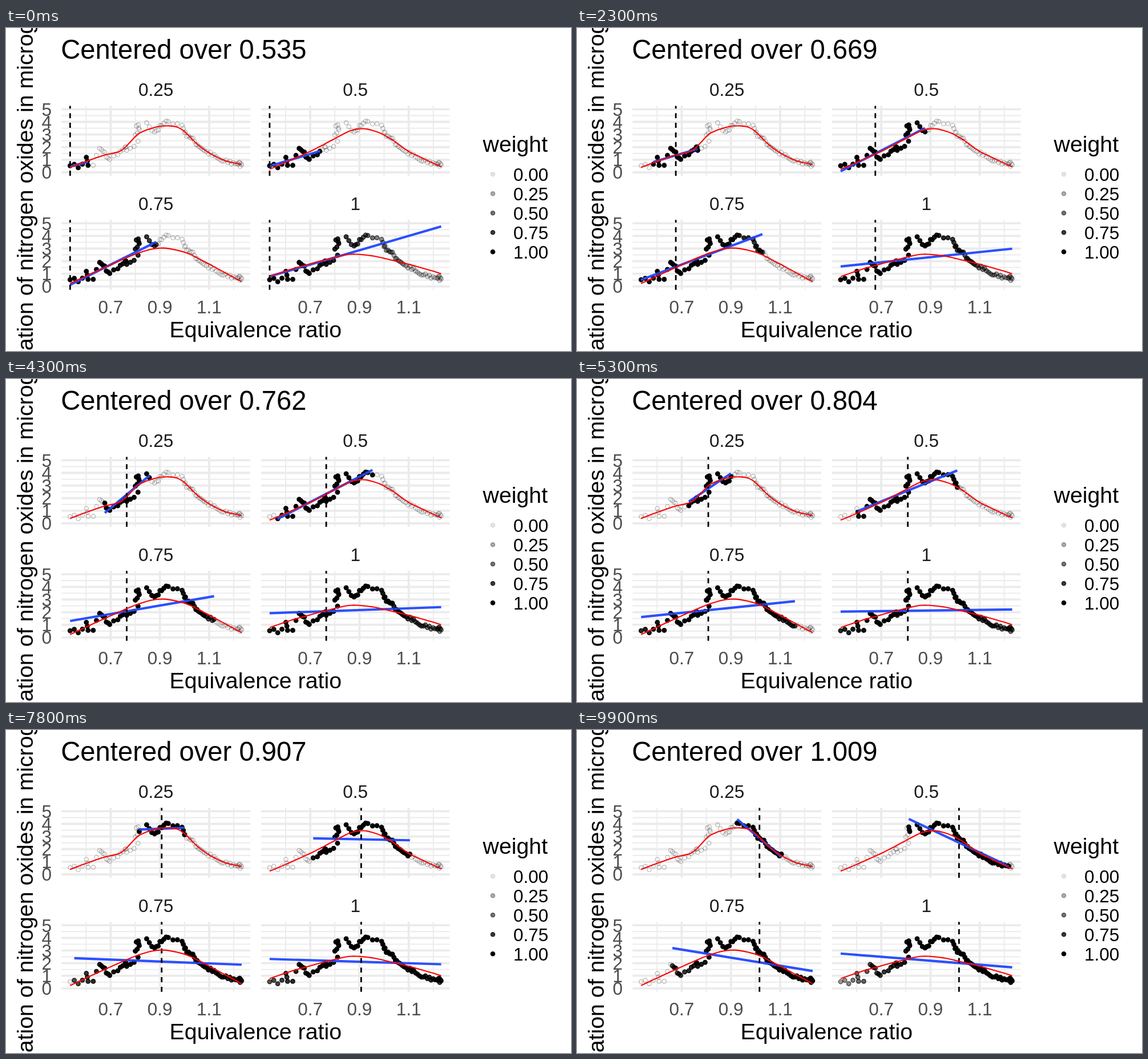
Write an HTML page that moves like this. It is 990 px wide and 566 px high and loops after 10000 ms.

```html
<!DOCTYPE html>
<html lang="en">
<head>
<meta charset="utf-8">
<title>Local regression</title>
<style>
  html, body { margin: 0; width: 100%; height: 100%; overflow: hidden; background: #fff; }
  svg { display: block; font-family: "Liberation Sans", Arial, sans-serif; font-size: 31.5px; }
  .title { font-size: 47.2px; }
  .label { font-size: 39.3px; }
  .mid { text-anchor: middle; }
  .end { text-anchor: end; }
  .tick { fill: #4d4d4d; }
  .strip { fill: #1a1a1a; }
  .grid { stroke: #ebebeb; }
  .dot { fill: #000; stroke: #000; stroke-width: 1.4; }
  .ring { fill: none; stroke: #000; stroke-width: 1.4; stroke-opacity: .25; }
  .fit { stroke: #2b50ff; stroke-width: 4.2; }
  .center { stroke: #000; stroke-width: 2.8; stroke-dasharray: 8.8 8; }
  .loess { fill: none; stroke: #f00; stroke-width: 2.1; stroke-linejoin: round; }
</style>
</head>
<body>
<svg id="stage" width="990" height="566" viewBox="0 0 990 566"></svg>
<script>
// Key observations: rank, ratio, oxides; the others scatter between them
const keys = [
  [0, .535, .53], [2, .568, .37], [4, .601, 1.19], [6, .608, .56], [7, .629, .56],
  [9, .655, 1.9], [15, .696, 1.03], [17, .729, 1.4], [20, .759, 2], [22, .765, 1.75],
  [24, .795, 2.06], [26, .804, 3.68], [28, .811, 2.47], [29, .812, 3.76], [31, .816, 3.39],
  [32, .846, 3.93], [35, .878, 3.21], [39, .907, 3.7], [42, .934, 4.03], [45, .99, 3.73],
  [49, 1.009, 2.85], [50, 1.016, 2.88], [61, 1.081, 1.72], [70, 1.152, .9],
  [78, 1.215, .68], [84, 1.232, .6]];

let seed = 7;
const random = () => (seed = seed * 16807 % 2147483647) / 2147483647;
const mix = (a, b, t) => a + (b - a) * t;

const points = [];
keys.slice(1).forEach(([rank, x, y], i) => {
  const [rank0, x0, y0] = keys[i];
  for (let r = rank0; r < rank; r++) {
    const t = (r - rank0) / (rank - rank0);
    const scatter = .45 * (random() - .5) * Math.sin(Math.PI * t);
    points.push({ x: Math.round(mix(x0, x, t) * 1000) / 1000, y: mix(y0, y, t) + scatter });
  }
  if (i === keys.length - 2) points.push({ x, y });
});
const xs = points.map(p => p.x);
const n = xs.length, first = xs[0], last = xs[n - 1], range = last - first;

const tricube = u => u < 1 ? (1 - u ** 3) ** 3 : 0;

// Weighted straight line, given by its value and slope at x0
function lineFit(x0, weight) {
  let s = 0, sx = 0, sy = 0, sxx = 0, sxy = 0;
  for (const p of points) {
    const w = weight(p.x), d = p.x - x0;
    s += w; sx += w * d; sy += w * p.y; sxx += w * d * d; sxy += w * d * p.y;
  }
  const slope = (s * sxy - sx * sy) / (s * sxx - sx * sx);
  return { x: x0, y: (sy - slope * sx) / s, slope };
}

// Local linear fits at the cell edges, blended with cubics in between
function loess(span) {
  const q = Math.floor(n * span), cell = Math.floor(n * span * .2);
  const edges = [first - .1 * range, last + .1 * range];
  (function split(l, u) {
    if (u - l + 1 <= cell) return;
    const m = (l + u) >> 1;
    edges.push((xs[m] + xs[m + 1]) / 2);
    split(l, m);
    split(m + 1, u);
  })(0, n - 1);
  const knots = edges.sort((a, b) => a - b).map(e => {
    const h = xs.map(x => Math.abs(x - e)).sort((a, b) => a - b)[q - 1];
    return lineFit(e, x => tricube(Math.abs(x - e) / h));
  });
  return xs.map(x => {
    const i = knots.findIndex(k => k.x >= x), a = knots[i - 1], b = knots[i];
    const h = b.x - a.x, t = (x - a.x) / h, r = 1 - t;
    return { x, y: r * r * ((1 + 2 * t) * a.y + t * h * a.slope)
                 + t * t * ((1 + 2 * r) * b.y - r * h * b.slope) };
  });
}

const stage = document.getElementById("stage");
function set(el, attrs) {
  for (const k in attrs) el.setAttribute(k, attrs[k]);
  return el;
}
function add(name, attrs, text) {
  const el = set(document.createElementNS("http://www.w3.org/2000/svg", name), attrs);
  if (text !== undefined) el.textContent = text;
  stage.append(el);
  return el;
}
const write = (cls, x, y, text) => add("text", { class: cls, x, y }, text);
const alpha = w => .1 + .9 * w;
const fade = (el, a) => set(el, { "fill-opacity": a, "stroke-opacity": a });

function makePanel({ span, reach, col, row }) {
  const left = 97.3 + 349.6 * col, top = 136.4 + 199.8 * row;
  const right = left + 330.6, bottom = top + 122.5;
  const px = x => left + (x - .50015) * 431.25;
  const py = y => top + 116.6 - y * 22.12;
  const rule = (x1, y1, x2, y2, width) =>
    add("line", { class: "grid", x1, y1, x2, y2, "stroke-width": width });

  for (let i = 0; i < 5; i++) rule(left, py(i + .5), right, py(i + .5), 1.9);
  for (let i = 0; i < 4; i++) rule(px(.6 + .2 * i), top, px(.6 + .2 * i), bottom, 1.9);
  for (let i = 0; i < 6; i++) rule(left, py(i), right, py(i), 3.8);
  for (let i = 0; i < 3; i++) rule(px(.7 + .2 * i), top, px(.7 + .2 * i), bottom, 3.8);

  write("strip mid", (left + right) / 2, top - 17, span);
  if (col === 0) for (let i = 0; i < 6; i++) write("tick end", 80, py(i) + 11.4, i);
  if (row === 1) for (const x of [.7, .9, 1.1]) write("tick mid", px(x), 500, x);

  const circle = (cls, p, r) => add("circle", { class: cls, cx: px(p.x), cy: py(p.y), r });
  const dots = points.map(p => circle("dot", p, 3.7));
  const fitLine = add("line", { class: "fit" });
  const centerLine = add("line", { class: "center", y1: bottom, y2: top });
  points.forEach(p => circle("ring", p, 3.6));
  add("polyline", {
    class: "loess",
    points: loess(span).map(p => px(p.x) + "," + py(p.y)).join(" ")
  });

  return c => {
    const near = x => Math.abs(x - c) < reach;
    const weight = x => near(x) ? tricube(Math.abs(x - c) / range) : 0;
    points.forEach((p, i) => fade(dots[i], near(p.x) ? alpha(weight(p.x)) : 0));
    const inside = xs.filter(near), a = inside[0], b = inside[inside.length - 1];
    const line = lineFit(c, weight), at = x => line.y + line.slope * (x - c);
    set(fitLine, { x1: px(a), y1: py(at(a)), x2: px(b), y2: py(at(b)) });
    set(centerLine, { x1: px(c), x2: px(c) });
  };
}

const panels = [
  { span: .25, reach: .093, col: 0, row: 0 },
  { span: .5, reach: .204, col: 1, row: 0 },
  { span: .75, reach: .356, col: 0, row: 1 },
  { span: 1, reach: 1, col: 1, row: 1 }
].map(makePanel);

const title = write("title", 96.3, 54.3, "");
write("label mid", 437.3, 542, "Equivalence ratio");
set(write("label mid", 0, 0, "Concentration of nitrogen oxides in micrograms/J"),
  { transform: "translate(47 297.7) rotate(-90)" });
write("label", 835.5, 217.2, "weight");
for (let i = 0; i < 5; i++) {
  const y = 256.3 + 34 * i;
  fade(add("circle", { class: "dot", cx: 853, cy: y, r: 3.6 }), alpha(i / 4));
  write("", 888.9, y + 11.3, (i / 4).toFixed(2));
}

// The data step ahead on odd ticks, the title catches up on even ones
let shown = -1;
function draw(now) {
  const tick = Math.floor((now % 10000) / 100);
  if (tick !== shown) {
    shown = tick;
    title.textContent = "Centered over " + xs[tick >> 1];
    panels.forEach(update => update(xs[(tick + 1) >> 1]));
  }
}
const start = performance.now();
function loop() {
  draw(performance.now() - start);
  requestAnimationFrame(loop);
}
loop();
</script>
</body>
</html>
```
